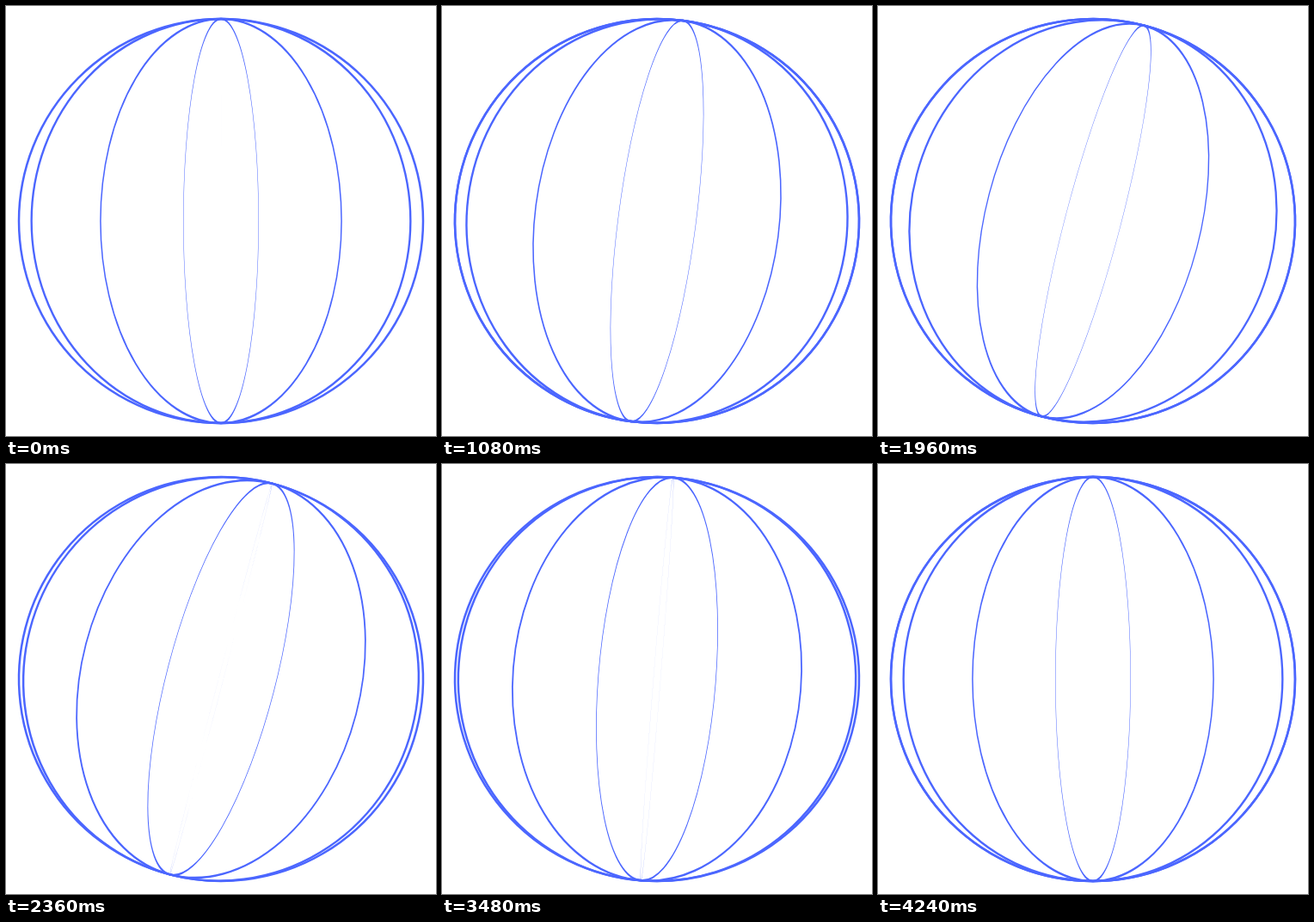
Recreate the animation shown at these times as an HTML page. Size 500 by 500 pixels, loop 4280 ms.

```html
<!DOCTYPE html>
<html lang="en">
<head>
<meta charset="utf-8">
<title>Turning globe</title>
<style>
  html, body { margin: 0; width: 100%; height: 100%; overflow: hidden; background: #fff; }
  svg { display: block; width: 100%; height: 100%; }
  circle { fill: none; stroke: #4b66ff; stroke-width: 2.5; }
</style>
</head>
<body>
<svg viewBox="0 0 500 500">
  <g id="globe">
    <circle r="235"/>
  </g>
</svg>
<script>
const LOOP = 4280;          // full loop, ms
const CYCLE = 4240;         // one meridian's life, ms
const GROW = CYCLE * 0.9;   // time to open from a line to a circle
const RINGS = 4;
const MAX_TILT = 15;
const RING_LEAD = 22;
const TILT_LAG = 30;

const globe = document.getElementById('globe');
const rings = Array.from({ length: RINGS }, () => {
  const ring = document.createElementNS('http://www.w3.org/2000/svg', 'circle');
  ring.setAttribute('r', 235);
  return globe.appendChild(ring);
});

const easeSine = x => (1 - Math.cos(Math.PI * x)) / 2;

function draw(t) {
  const tilt = MAX_TILT * easeSine(2 * (t - TILT_LAG) / CYCLE);
  globe.setAttribute('transform', `translate(250 250) rotate(${tilt})`);

  rings.forEach((ring, i) => {
    let age = t + i * CYCLE / RINGS;
    if (age > LOOP) age -= CYCLE;
    const width = easeSine(Math.min(1, (age + RING_LEAD) / GROW));
    // Scaling the outline too thins the sides of narrow meridians
    ring.setAttribute('transform', `scale(${width} 1)`);
  });
}

const start = performance.now();
function tick() {
  draw((performance.now() - start) % LOOP);
  requestAnimationFrame(tick);
}
draw(0);
requestAnimationFrame(tick);
</script>
</body>
</html>
```
